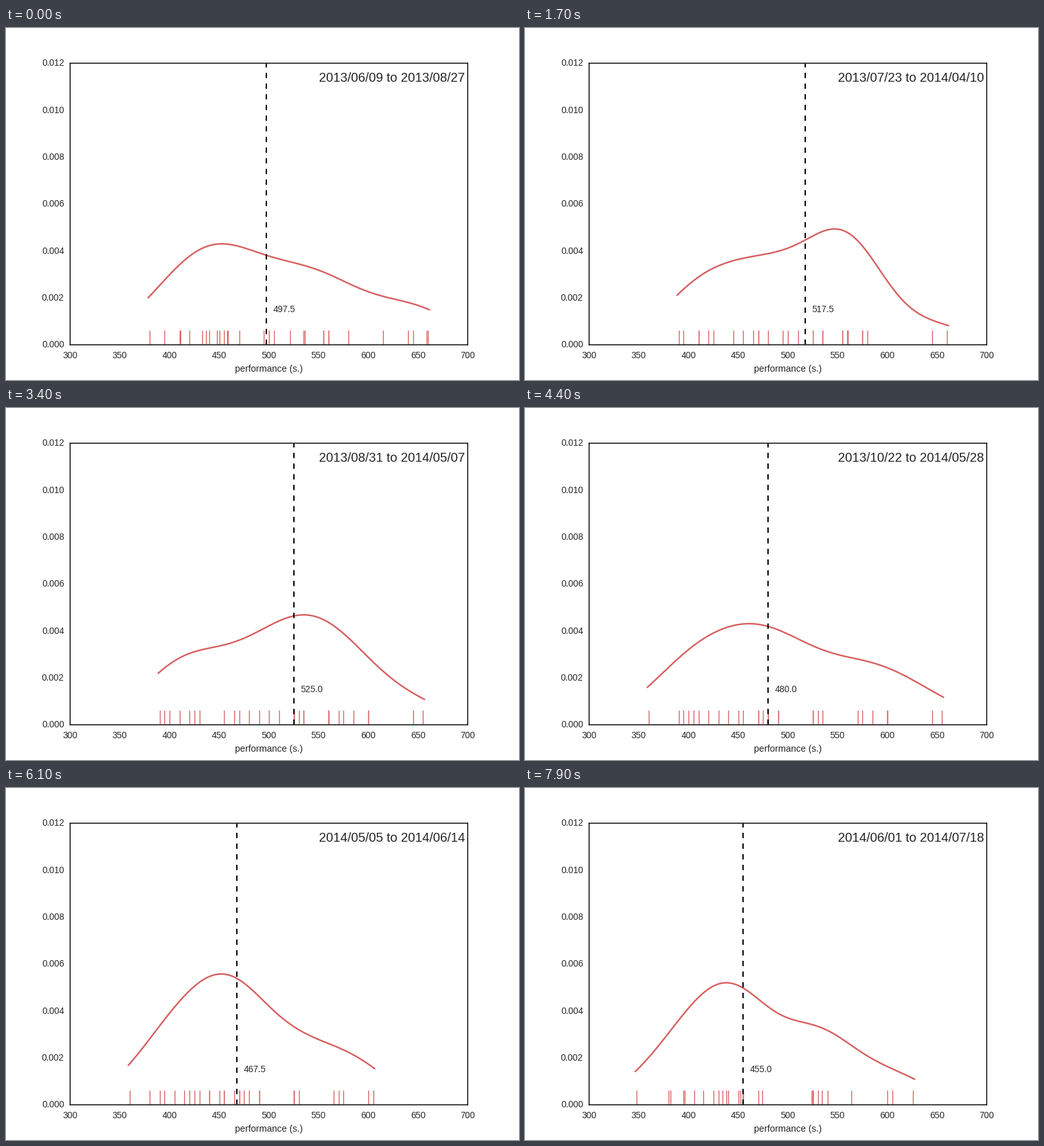
These frames come from a looping animation (800 by 550 pixels, 8000 ms). A matplotlib script:

```python
import numpy as np
import matplotlib.pyplot as plt
from matplotlib.animation import FuncAnimation

W, H, DPI = 800, 550, 100
FRAMES, STEP_MS, WINDOW = 80, 100, 30
INK, RED = "0.15", "#d65f5f"

plt.rcParams.update({
    "font.family": "Liberation Sans",
    "text.color": INK,
    "lines.scale_dashes": False,
})

# Performance log in seconds, in order of time
times = np.array([
    500, 433, 615, 640, 448, 411, 659, 521, 437, 458, 380, 505, 450, 459,
    420, 536, 440, 535, 410, 645, 455, 560, 495, 555, 660, 395, 470, 580,
    555, 560, 445, 575, 410, 470, 560, 390, 525, 500, 560, 425, 535, 465,
    510, 560, 480, 575, 420, 535, 600, 395, 525, 430, 655, 410, 585, 455,
    400, 645, 470, 600, 525, 530, 490, 570, 440, 390, 475, 450, 480, 360,
    600, 405, 490, 470, 425, 575, 465, 420, 565, 455, 525, 380, 430, 605,
    470, 525, 395, 455, 440, 525, 415, 438, 524, 600, 425, 564, 455, 540,
    452, 530, 396, 474, 382, 348, 534, 450, 626, 406, 434,
], dtype=float)

# Known days; the ones between are interpolated
known_days = {
    0: "2013-06-09", 17: "2013-07-23", 18: "2013-07-23", 29: "2013-08-27",
    34: "2013-08-31", 44: "2013-10-22", 46: "2014-04-10", 47: "2014-04-10",
    61: "2014-05-05", 63: "2014-05-07", 68: "2014-05-16", 73: "2014-05-28",
    79: "2014-06-01", 90: "2014-06-14", 97: "2014-06-27", 108: "2014-07-18",
}
epoch = np.datetime64("2013-06-09")
offsets = [int((np.datetime64(d) - epoch) / np.timedelta64(1, "D"))
           for d in known_days.values()]
days = np.interp(np.arange(len(times)), list(known_days), offsets).astype(int)


def day_label(i):
    return str(epoch + np.timedelta64(int(days[i]), "D")).replace("-", "/")


def kde(data, grid):
    """Gaussian density with Scott's bandwidth."""
    h = data.std(ddof=1) * len(data) ** -0.2
    z = (grid[:, None] - data) / h
    return np.exp(-z ** 2 / 2).sum(axis=1) / (len(data) * h * np.sqrt(2 * np.pi))


fig = plt.figure(figsize=(W / DPI, H / DPI), dpi=DPI, facecolor="white")
ax = fig.add_axes([0.125, 0.1, 0.775, 0.8])
ax.set(xlim=(300, 700), ylim=(0, 0.012), xticks=[], yticks=[])
for spine in ax.spines.values():
    spine.set(color=INK, linewidth=1.25)


def put(x, y, s, size=10, ha="center"):
    """Text with its baseline at pixel (x, y) from the top left."""
    return fig.text(x / W, 1 - y / H, s, size=size, ha=ha, va="baseline")


for v in range(300, 701, 50):
    put(100 + (v - 300) * 1.55, 516, str(v))
for k in range(7):
    put(90.8, 495 - k * 440 / 6 + 4.3, f"{k * 0.002:.3f}", ha="right")
put(410, 537, "performance (s.)", size=10.4)
span = put(715.7, 84, "", size=14.4, ha="right")

curve, = ax.plot([], [], color=RED, lw=1.75, solid_capstyle="round")
rug = [ax.axvline(0, 0, 0.05, color=RED, lw=1) for _ in range(WINDOW)]
median_line = ax.axvline(0, color="k", lw=1.5, ls=(0, (6, 6)),
                         dash_capstyle="butt")
median_text = ax.text(0, 0.0014, "", size=10, ha="left", va="baseline")


def draw(i):
    data = times[i:i + WINDOW]
    pad = 3 * WINDOW ** -0.2
    grid = np.linspace(data.min() - pad, data.max() + pad, 100)
    curve.set_data(grid, kde(data, grid))
    for tick, v in zip(rug, data):
        tick.set_xdata([v, v])
    mid = np.median(data)
    median_line.set_xdata([mid, mid])
    median_text.set_x(mid + 6.8)
    median_text.set_text(f"{mid:.1f}")
    span.set_text(f"{day_label(i)} to {day_label(i + WINDOW - 1)}")
    return [curve, *rug, median_line, median_text, span]


anim = FuncAnimation(fig, draw, frames=FRAMES, interval=STEP_MS,
                     repeat=True, repeat_delay=0, blit=False)
plt.show()
```
